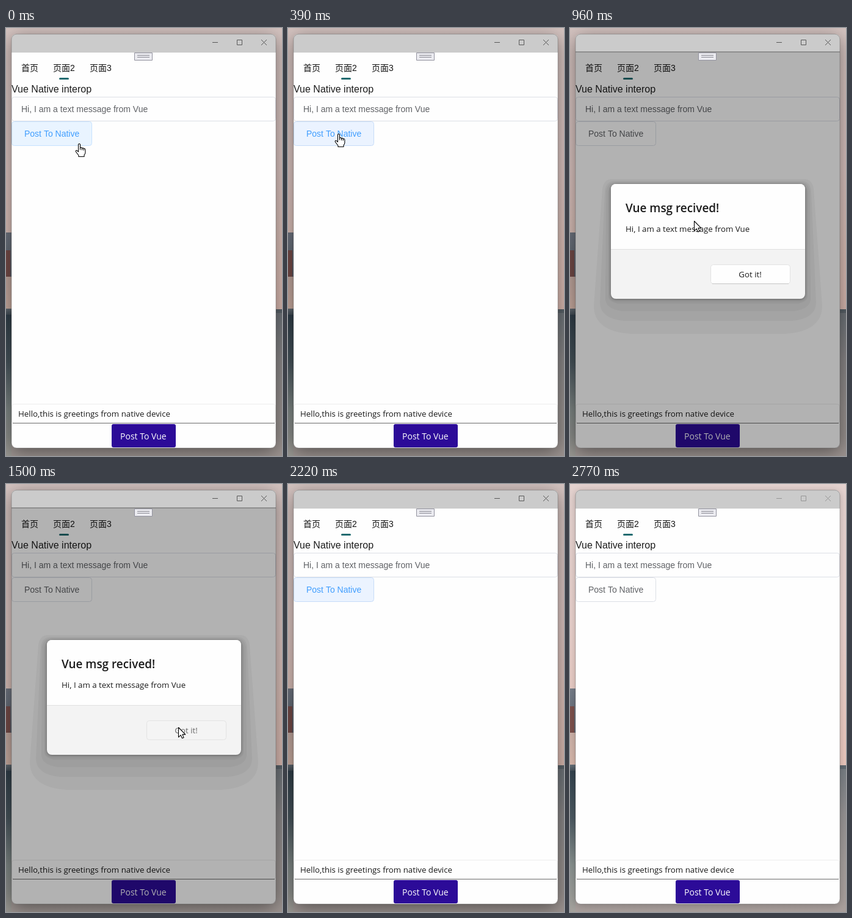
An HTML page with a canvas that plays this animation: 452 by 697 pixels, repeating every 3070 ms.

```html
<!DOCTYPE html>
<html lang="en">
<head>
<meta charset="utf-8">
<title>Vue Native interop</title>
<style>
html, body { margin: 0; width: 100%; height: 100%; overflow: hidden; }
canvas { display: block; width: 452px; height: 697px; }
</style>
</head>
<body>
<canvas id="stage" width="452" height="697"></canvas>
<script>
const W = 452, H = 697, LOOP = 3070;
const ctx = document.getElementById('stage').getContext('2d');
const WEB = '"Liberation Sans", "Noto Sans CJK SC", "Noto Sans CJK", sans-serif';
const UI = '"Open Sans", "Noto Sans", sans-serif';

// Pointer steps: time, shape, hot spot
const POINTER = [
  [0, 'hand', 120, 188], [120, 'hand', 119, 190], [270, 'hand', 99, 180],
  [390, 'hand', 83, 172], [540, 'arrow', 83, 173], [840, 'arrow', 112, 207],
  [960, 'arrow', 203, 314], [1080, 'arrow', 267, 380], [1230, 'arrow', 279, 392],
  [1350, 'arrow', 282, 396], [1940, 'arrow', 386, 540], [2090, 'arrow', 369, 681],
  [2220, 'none', 0, 0]
];

// Looks of the "Post To Native" button: fill, border, text
const LOOK = {
  hover: ['#e9f4ff', '#c6e2ff', '#409eff'],
  held: ['#ebf3ff', '#c6dcf8', '#409eff'],
  pressed: ['#ecf5ff', '#80aee6', '#409eff'],
  fading: ['#f5faff', '#d1e0f2', '#5080b2'],
  plain: ['#fefefe', '#dcdfe6', '#606266']
};

function buttonLook(t) {
  if (t < 270) return LOOK.hover;
  if (t < 540) return LOOK.held;
  if (t < 690) return LOOK.pressed;
  if (t < 1630) return LOOK.plain;
  if (t < 2650) return LOOK.held;
  return t < 2770 ? LOOK.fading : LOOK.plain;
}

function rect(x, y, w, h, color) {
  ctx.fillStyle = color;
  ctx.fillRect(x, y, w, h);
}

function box(x, y, w, h, r, fill, stroke) {
  const inset = stroke ? 0.5 : 0;
  ctx.beginPath();
  ctx.roundRect(x + inset, y + inset, w - 2 * inset, h - 2 * inset, r);
  if (fill) { ctx.fillStyle = fill; ctx.fill(); }
  if (stroke) { ctx.strokeStyle = stroke; ctx.lineWidth = 1; ctx.stroke(); }
}

function text(str, x, y, font, color, align = 'left') {
  ctx.font = font;
  ctx.fillStyle = color;
  ctx.textAlign = align;
  ctx.fillText(str, x, y);
}

function gradient(x, y, w, h, stops) {
  const g = ctx.createLinearGradient(0, y, 0, y + h);
  stops.forEach((c, i) => g.addColorStop(i / (stops.length - 1), c));
  rect(x, y, w, h, g);
}

function wallpaper() {
  gradient(0, 0, W, 458, ['#e5d3d0', '#ead2cd', '#e9c6bc']);
  gradient(0, 458, W, 239, ['#737a80', '#928f90', '#a19b99', '#a99f9c']);
  rect(442, 458, 10, 6, '#5f6870');
  gradient(0, 333, 9, 72, ['#767d89', '#626874']);
  rect(0, 362, 7, 43, '#7c504c');
  gradient(0, 405, 9, 52, ['#cdb2a9', '#d8b8ab']);
  gradient(0, 457, 9, 10, ['#69727a', '#46515a']);
  gradient(0, 467, 9, 230, ['#33424d', '#4b5961', '#87908e', '#a5a29d']);
}

function windowShadow(focus) {
  rect(0, 0, W, H, `rgba(0,0,0,${0.07 * focus})`);
  ctx.save();
  ctx.shadowColor = `rgba(0,0,0,${0.24 + 0.22 * focus})`;
  ctx.shadowBlur = 14 + 16 * focus;
  ctx.shadowOffsetY = 2 + 4 * focus;
  box(9, 10, 433, 674, 8, '#fefefe');
  ctx.restore();
}

function titleBar(focus) {
  rect(9, 10, 433, 30, '#cbcbcb');
  const tone = Math.round(150 - 62 * focus);
  ctx.strokeStyle = `rgb(${tone},${tone},${tone})`;
  ctx.lineWidth = 1;
  ctx.beginPath();
  ctx.moveTo(338, 23.5); ctx.lineTo(347, 23.5);
  ctx.rect(378.5, 19.5, 8, 8);
  ctx.moveTo(418, 19); ctx.lineTo(427, 28);
  ctx.moveTo(427, 19); ctx.lineTo(418, 28);
  ctx.stroke();
}

function handle() {
  box(210, 40, 30, 13, 0, '#ebebf0', '#92929e');
  rect(215, 44, 20, 1, '#85858f');
  rect(215, 47, 20, 1, '#85858f');
}

function page(t) {
  const web = '14px ' + WEB;
  text('首页', 25, 70, web, '#141414');
  text('页面2', 77, 70, web, '#141414');
  text('页面3', 137, 70, web, '#141414');
  box(87, 81, 16, 3, 1.5, '#216b70');
  text('Vue Native interop', 9, 105, '16px ' + WEB, '#1c1c1c');

  box(9, 112, 433, 40, 4, '#fefefe', '#dcdfe6');
  text('Hi, I am a text message from Vue', 25, 137, web, '#606266');
  const [fill, border, ink] = buttonLook(t);
  box(9, 152, 132, 40, 4, fill, border);
  text('Post To Native', 30, 177, web, ink);

  box(9, 612, 433, 32, 4, '#fefefe', '#ececec');
  rect(11, 643, 429, 1, '#6c6c6c');
  text('Hello,this is greetings from native device', 20, 633, '13.3px ' + UI, '#1a1a1a');
  box(173, 645, 105, 38, 3, '#2c0b98');
  text('Post To Vue', 187, 670, '14px ' + UI, '#ffffff');
}

// One step of the dialog's banded shadow: narrow on top, wide below
function shadowBand(topX, top, sideX, bottom, r) {
  const mx = 452, low = bottom - r;
  ctx.beginPath();
  ctx.moveTo(topX + 14, top);
  ctx.lineTo(mx - topX - 14, top);
  ctx.quadraticCurveTo(mx - topX, top, mx - topX + 2, top + 16);
  ctx.lineTo(mx - sideX, low);
  ctx.quadraticCurveTo(mx - sideX, bottom - 4, mx - sideX - r * 1.3, bottom);
  ctx.lineTo(sideX + r * 1.3, bottom);
  ctx.quadraticCurveTo(sideX, bottom - 4, sideX, low);
  ctx.lineTo(topX - 2, top + 16);
  ctx.quadraticCurveTo(topX, top, topX + 14, top);
  ctx.fillStyle = 'rgba(0,0,0,0.038)';
  ctx.fill();
}

function dialog(pressed) {
  shadowBand(55, 246, 39, 498, 46);
  shadowBand(59, 249, 49, 477, 30);
  shadowBand(61, 251, 58, 461, 20);
  shadowBand(64, 253, 63, 449, 12);
  ctx.save();
  ctx.shadowColor = 'rgba(0,0,0,0.35)';
  ctx.shadowBlur = 4;
  ctx.shadowOffsetY = 1;
  box(67, 254, 318, 187, 8, '#f3f3f3');
  ctx.restore();
  box(67, 254, 318, 106, [8, 8, 0, 0], '#fefefe');
  rect(67, 360, 318, 1, '#e0e0e0');
  text('Vue msg recived!', 91, 300, '600 18.9px ' + UI, '#1b1b1b');
  text('Hi, I am a text message from Vue', 91, 332, '13.3px ' + UI, '#1b1b1b');
  box(230, 385, 131, 32, 4, pressed ? '#f4f4f4' : '#fefefe', '#e3e3e3');
  if (!pressed) rect(233, 416, 125, 1, '#c6c6c6');
  text('Got it!', 295, 406, '13.3px ' + UI, pressed ? '#6a6a6a' : '#1b1b1b', 'center');
}

const ARROW = new Path2D('M.5.5V16.3L4.2 12.9 6.5 18 9.1 16.9 6.9 11.9H11.8Z');
const HAND = new Path2D('M-1.5 1.5Q0-.5 1.5 1.5V7Q3.5 5.8 4.5 7.8 6.3 6.8 7.3 8.6 ' +
  '9.8 7.8 9.9 10.5V15Q9.6 17.5 8 19V21.5H-1V19.5L-5.6 13.5Q-6.4 11-4 11.3L-1.5 13.6Z');
const FINGERS = new Path2D('M1.5 7V10.5M4.5 8V11M7.3 9V11.5');

function pointer(t) {
  const [, kind, x, y] = POINTER.findLast(p => p[0] <= t);
  if (kind === 'none') return;
  const shape = kind === 'hand' ? HAND : ARROW;
  ctx.save();
  ctx.translate(x, y);
  ctx.lineJoin = 'round';
  ctx.lineWidth = 1.1;
  ctx.fillStyle = '#fff';
  ctx.strokeStyle = '#000';
  ctx.fill(shape);
  ctx.stroke(shape);
  if (kind === 'hand') ctx.stroke(FINGERS);
  ctx.restore();
}

function draw(t) {
  const focus = t < 2650 ? 1 : t < 2770 ? 0.5 : 0;
  const modal = t >= 540 && t < 1630;
  ctx.clearRect(0, 0, W, H);
  wallpaper();
  windowShadow(focus);
  ctx.save();
  ctx.beginPath();
  ctx.roundRect(9, 10, 433, 674, 8);
  ctx.clip();
  titleBar(focus);
  page(t);
  if (modal) rect(9, 38, 433, 646, 'rgba(0,0,0,0.3)');
  handle();
  if (modal) dialog(t >= 1500);
  ctx.restore();
  box(8.5, 9.5, 434, 675, 8.5, null, 'rgba(70,70,70,0.35)');
  pointer(t);
}

const start = performance.now();
function tick() {
  draw((performance.now() - start) % LOOP);
  requestAnimationFrame(tick);
}
tick();
</script>
</body>
</html>
```
